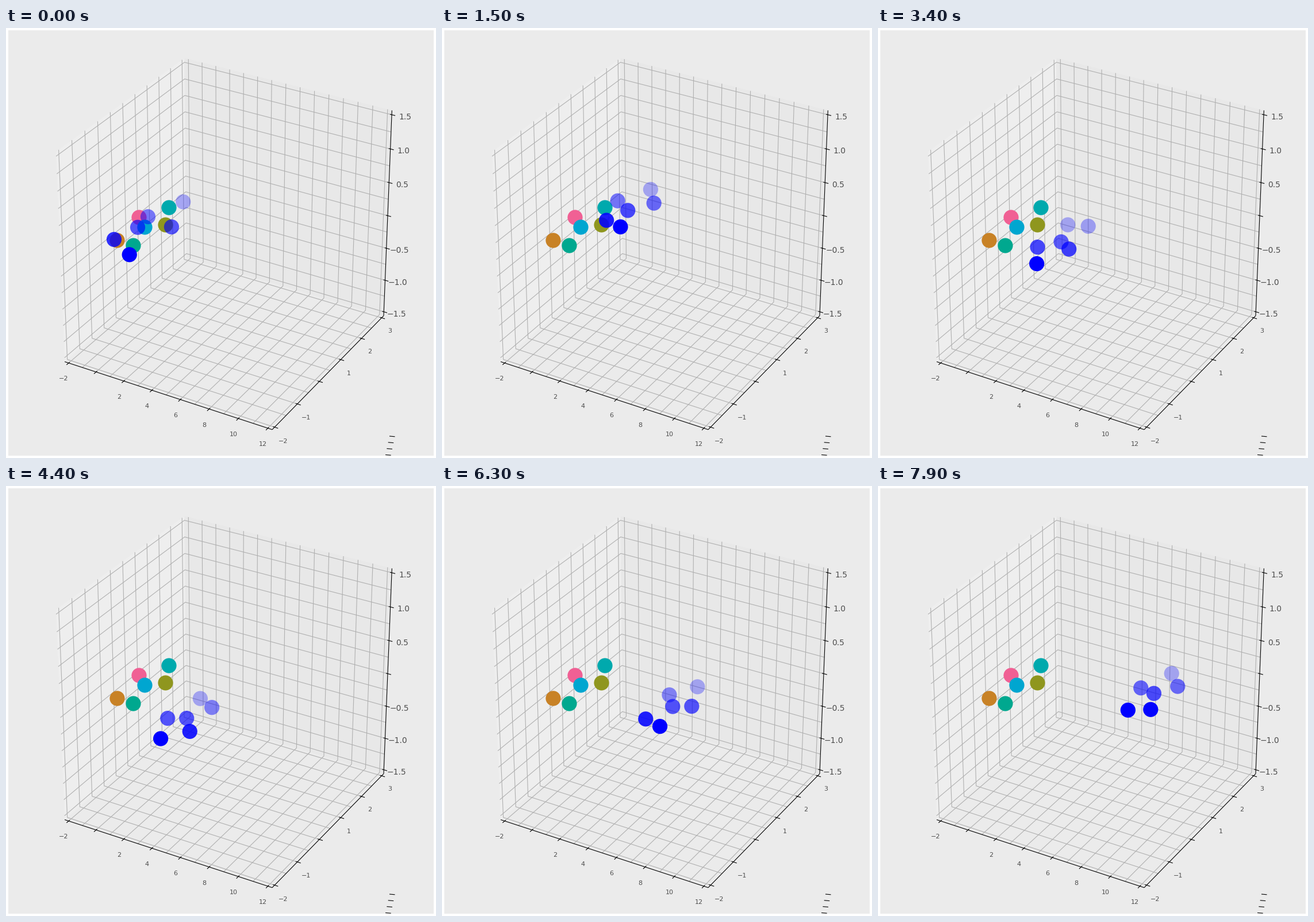
These frames come from a looping animation (748 px wide and 748 px high, 8000 ms). A matplotlib script:

```python
import numpy as np
import matplotlib.pyplot as plt
from matplotlib.animation import FuncAnimation
from matplotlib.collections import LineCollection
from matplotlib.patches import Polygon, Rectangle

SIZE, DPI = 748, 100
FRAMES, STEP = 80, 100
E = 0.5 + 1 / 48              # pane edge in the unit box
PAD = 0.0425                  # tick label distance
RADIUS = 13.1

# Perspective camera: elevation 30, azimuth -60, distance 10
EL, AZ = np.radians([30, -60])
NEAR = np.array([np.cos(EL) * np.cos(AZ), np.cos(EL) * np.sin(AZ), np.sin(EL)])
RIGHT = np.array([-np.sin(AZ), np.cos(AZ), 0])
UP = np.cross(NEAR, RIGHT)


def project(p):
    """Unit box coordinates to stage pixels."""
    p = np.asarray(p, float)
    w = 10 - p @ NEAR
    return np.stack([384 + 4000 * (p @ RIGHT) / w,
                     364 - 4000 * (p @ UP) / w], axis=-1)


def to_box(xy):
    """Data coordinates on the plane z = 0 to the unit box."""
    x, y = xy.T
    return np.column_stack([(x - 5) / 14, (y - 0.5) / 5, 0 * x])


def formation(t, turn):
    """Pentagon plus centre, carried along a sine wave."""
    a = np.radians(90 + 72 * np.arange(5)) + turn
    shape = np.vstack([np.column_stack([np.cos(a), np.sin(a)]), [0, 0]])
    return shape + [t, np.sin(t)]


fig = plt.figure(figsize=(SIZE / DPI, SIZE / DPI), dpi=DPI, facecolor="white")
ax = fig.add_axes([0, 0, 1, 1])
ax.set_xlim(0, SIZE)
ax.set_ylim(SIZE, 0)
ax.axis("off")
ax.add_patch(Rectangle((4, 4), 740, 740, color="#EBEBEB", lw=0, zorder=0))


def add_lines(lines, color, z):
    ax.add_collection(LineCollection(lines, colors=color, linewidths=0.8, zorder=z))


def pane(corners, shade):
    ax.add_patch(Polygon(project(corners), facecolor=str(shade), alpha=0.5,
                         lw=0, zorder=1))


pane([(-E, -E, -E), (-E, E, -E), (-E, E, E), (-E, -E, E)], 0.95)
pane([(-E, E, -E), (E, E, -E), (E, E, E), (-E, E, E)], 0.90)
pane([(-E, -E, -E), (E, -E, -E), (E, E, -E), (-E, E, -E)], 0.925)

grid = [project([(u, -E, -E), (u, E, -E), (u, E, E)])
        for u in np.linspace(-0.5, 0.5, 15)]
grid += [project([(E, u, -E), (-E, u, -E), (-E, u, E)])
         for u in np.linspace(-0.5, 0.5, 11)]
grid += [project([(-E, -E, u), (-E, E, u), (E, E, u)])
         for u in np.linspace(-0.5, 0.5, 13)]
add_lines(grid, "#B0B0B0", 2)

add_lines([project([(-E, -E, -E), (E, -E, -E)]),
           project([(E, -E, -E), (E, E, -E)]),
           project([(E, E, -E), (E, E, E)])], "black", 3)


def ticks(values, fmt, size, point, out, shift):
    """Tick marks along one edge; the zero label stays empty."""
    out, shift = np.array(out), np.array(shift)
    for u, v in zip(np.linspace(-0.5, 0.5, len(values)), values):
        p = np.array(point(u))
        add_lines([project([p - out / 120, p + out / 60])], "black", 3)
        if v:
            x, y = project(p + PAD * shift)
            ax.text(x, y, format(v, fmt).replace("-", "\u2212"), size=size,
                    family="DejaVu Sans", color="#4D4D4D", ha="center", va="top",
                    zorder=4)


ticks(range(-2, 13, 2), "d", 8, lambda u: (u, -E, -E), (0, -1, 0), (0, -1, -1))
ticks(range(-2, 4), "d", 8, lambda u: (E, u, -E), (1, 0, 0), (1, 0, -1))
ticks(np.arange(-3, 4) / 2, ".1f", 10, lambda u: (E, E, u), (1, 0, 0), (1, 1, 0))

# Stray marks in the lower right corner
add_lines([[(667 - 2.3 * k, 710 + 10.8 * k), (676.5 - 2.3 * k, 710.8 + 10.8 * k)]
           for k in range(4)], "black", 3)

DOT = dict(s=(2 * RADIUS * 72 / DPI) ** 2, linewidths=0)
home = project(to_box(formation(0, 0)))
for (x, y), color in zip(home, ["#00A9AD", "#F06094", "#C88226", "#00A88F",
                                "#8F961E", "#00A6D0"]):
    ax.scatter(x, y, c=color, zorder=5, **DOT)

# Each agent starts off its slot and settles as a damped swing
START = np.array([(0.41, 0.22), (0.52, -0.17), (-0.02, -0.24),
                  (0.59, -0.49), (0.55, -0.08), (-0.24, -0.27)])
KICK = np.array([(-0.25, 0.10), (0.06, 0.43), (0.18, -0.06),
                 (0.53, 0.75), (0.28, 0.43), (0.33, -0.15)])
DAMPING = np.where(np.arange(6) < 2, 0.4, 1.2)[:, None]
SWING = 1.05
BIAS = (-0.10, 0.17)
LAG = 0.115


def agents(t):
    swing = START * np.cos(SWING * t) + KICK * np.sin(SWING * t)
    return formation(t, t - LAG) + BIAS + swing * np.exp(-DAMPING * t)


dots = ax.scatter(*home.T, color="blue", zorder=6, **DOT)


def update(i):
    p = to_box(agents(i * STEP / 1000))
    p = p[np.argsort(p @ NEAR)]
    depth = p @ NEAR
    rgba = np.zeros((len(p), 4))
    rgba[:, 2] = 1
    rgba[:, 3] = 0.3 + 0.7 * (depth - depth[0]) / (depth[-1] - depth[0])
    dots.set_offsets(project(p))
    dots.set_facecolor(rgba)
    return dots,


anim = FuncAnimation(fig, update, frames=FRAMES, interval=STEP, repeat=True,
                     repeat_delay=0)
plt.show()
```
